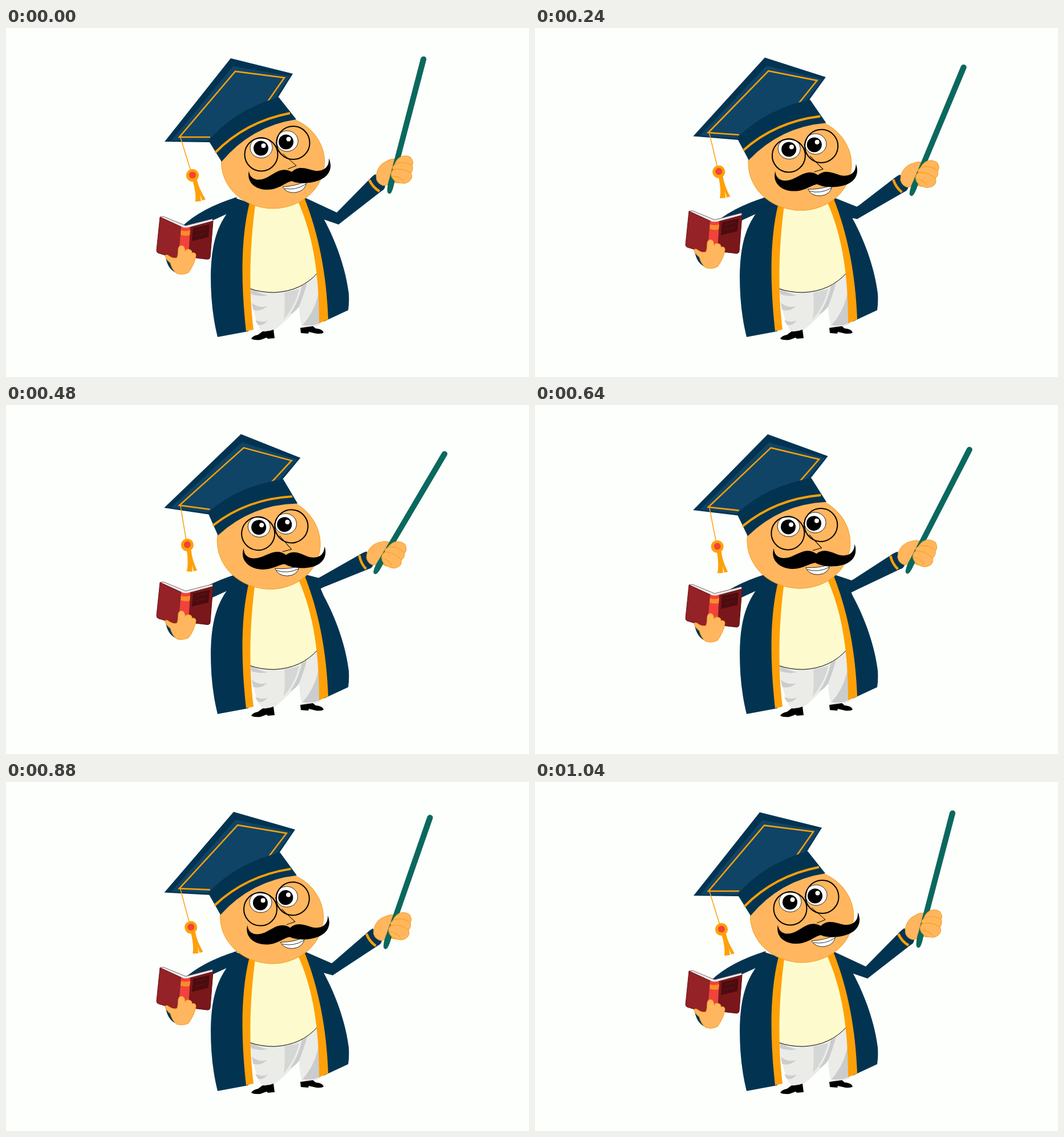
An HTML page for the animation above (1120 ms loop, 917 px wide and 611 px high).

```html
<!DOCTYPE html>
<html lang="en">
<head>
<meta charset="utf-8">
<title>Professor with pointer</title>
<style>
  html, body { margin: 0; width: 100%; height: 100%; overflow: hidden; background: #fcfffc; }
  svg { display: block; width: 917px; height: 611px; }
  .navy { fill: #023452; }
  .blue { fill: #0f4467; }
  .gold { fill: #ffa008; }
  .skin { fill: #ffb65e; }
  .edge { stroke: #f6a32a; stroke-width: 1.1; }
  .goldLine { fill: none; stroke: #ffa008; }
  .ink { fill: none; stroke: #000; }
</style>
</head>
<body>
<svg viewBox="0 0 917 611">
  <!-- left sleeve -->
  <path class="navy" d="M405 296Q343 315 309 347L325 362L362 337L395 322Z"/>

  <!-- pointing arm -->
  <path id="upperArm" class="navy"/>
  <g id="foreArm">
    <path class="navy" d="M580 323L640 262Q645 257 648 256Q653 269 665 276Q664 283 659 285L583 344Z"/>
    <path class="goldLine" stroke-width="4.5" d="M637 266Q643 279 655 286"/>
    <path class="skin edge" d="M650 266C647 252 655 238 668 233Q677 227 688 231L706 264Q694 274 680 270L664 276Q654 275 650 266Z"/>
    <path fill="#08695f" stroke="#075049" stroke-width=".6" d="M727.5 53Q729 49.500 733 50Q737.500 51 736.500 56L682 263Q679 282 675 288.500Q671 292 669 287Q668 277 673 262Z"/>
    <path class="skin edge" d="M681 240Q686 226 697 224Q710 223 712 231Q715 236 712 240Q715 247 710 254Q714 262 707 268Q700 274 690 271Q680 269 676 260Q674 253 679 248Q676 244 681 240Z"/>
    <path class="goldLine" stroke-width="1.1" d="M683 238Q697 232 711 240M679 248Q696 244 710 254M677 260Q687 258 697 268"/>
  </g>

  <!-- trousers and shoes -->
  <path fill="#ebebe8" d="M427 450L432 485Q438 514 447 529Q460 534 470 529Q486 518 514 488Q515 510 519 523Q536 526 551 519L551 425Z"/>
  <g fill="#cacccd">
    <path d="M429 456Q444 465 459 468Q444 471 430 466Z"/>
    <path d="M431 481Q442 491 458 487Q445 498 433 493Z"/>
    <path d="M437 511Q448 517 459 512Q450 523 441 519Z"/>
    <path opacity=".65" d="M488 463L514 457Q507 487 487 510Q490 486 488 463Z"/>
    <path d="M519 449Q515 477 498 501Q508 497 514 487Q522 468 528 445Z"/>
    <path d="M549 458Q543 495 520 520Q537 523 551 516Z"/>
  </g>
  <path d="M430 544Q432 539 442 537L450 531Q460 532 469 528L471 543L459 544L457 542L446 546Q435 547 430 544ZM516 525L538 522L543 526Q555 527 557 533Q554 536 544 535L531 532L530 535L517 534Z"/>

  <!-- robe and shirt -->
  <path class="navy" d="M400 297L430 307L420 400L425 531L371 541C362 505 359 470 359 434C360 388 366 353 390 321Z"/>
  <path class="navy" d="M520 296L546 308L557 334C579 374 596 423 601 465Q602 482 600 494L557 514C560 430 547 355 520 296Z"/>
  <path fill="#fdfbcd" d="M432 300L518 300Q543 355 547 428Q521 462 470 463Q446 463 427 456Q424 375 432 300Z"/>
  <path class="ink" stroke-width="1" d="M427 456Q446 463 470 463Q518 461 547 428"/>
  <path class="gold" d="M427 306L437 310C429 370 424 450 434 528L421 531C412 450 411 370 427 306Z"/>
  <path class="gold" d="M513 306L523 297C548 360 562 430 565 510L549 517C549 440 541 370 513 306Z"/>

  <!-- book hand -->
  <g id="book">
    <path class="navy" d="M280 401Q283 421 297 428L303 424L289 404Z"/>
    <path fill="#e9eef0" stroke="#6b3436" stroke-width=".8" d="M270 331L276 330L315 346L362 334L363 339L320 354Z"/>
    <path fill="#942226" stroke="#6e1418" d="M270 331L307 348L303 405L267 394Q264 393 264 389Z"/>
    <path fill="#7a171b" stroke="#5e1014" d="M322 349L363 338L358 401Q358 404 354 405L320 401Z"/>
    <path fill="#4c0c0f" d="M328 350L357 344L355 366L326 373Z"/>
    <path fill="none" stroke="#6a1418" d="M332 355L352 350M331 364L350 359"/>
    <path fill="#f1433b" d="M307 348Q315 351 323 348L320 403L302 404Z"/>
    <path fill="#fb8b2b" d="M307 354Q315 357 323 354L322 363Q314 365 306 362Z"/>
    <path class="skin edge" d="M279 399Q280 396 284 398Q293 405 300 402Q302 397 302 387Q303 381 308 381Q313 381 314 391Q317 386 322 388Q326 389 326 394Q332 392 333 398Q331 413 320 428Q311 433 300 430Q292 425 288 411Q280 405 279 399Z"/>
  </g>

  <!-- head and cap -->
  <g id="head">
    <ellipse class="skin edge" cx="468" cy="234.5" rx="90.5" ry="81.5"/>
    <path class="navy" d="M394 53L503 80L476 123L358 200L278 199Z"/>
    <path class="blue" d="M398 67L498 84L470 126L358 197L290 197Z"/>
    <path class="goldLine" stroke-width="2.6" d="M358 191L304 191L402 76L488 87L458 130"/>
    <path class="navy" d="M355 197Q400 144 478 121L509 160Q430 172 378 234Z"/>
    <path class="goldLine" stroke-width="4" d="M367 218Q420 164 498 149"/>

    <path class="goldLine" stroke-width="1.5" d="M306 192L324 250"/>
    <path class="gold" d="M327 266L335 266Q338 281 350 300L344 302L340 291L342 303L332 304Q334 290 327 266Z"/>
    <circle class="gold" cx="327" cy="258" r="11"/>
    <circle fill="#f04438" cx="327" cy="257.5" r="6"/>

    <g fill="#fff" stroke="#000" stroke-width=".8">
      <ellipse cx="447.5" cy="209.5" rx="19.5" ry="18"/>
      <ellipse cx="493" cy="198" rx="19" ry="18"/>
      <path d="M485 278Q507 277 527 268Q526 285 508 288Q492 290 485 278Z"/>
      <path fill="none" d="M488 281Q508 285 526 273"/>
    </g>
    <circle cx="447" cy="210.5" r="13"/>
    <circle cx="491" cy="199.5" r="13"/>
    <g fill="#fff">
      <circle cx="451.5" cy="206" r="4"/>
      <circle cx="495.5" cy="194.5" r="4"/>
    </g>
    <g class="ink" stroke-width="2">
      <circle cx="447.5" cy="221.5" r="29"/>
      <circle cx="503.5" cy="201" r="29"/>
    </g>
    <path class="ink" stroke-width="1" d="M477 217Q476 206 473 200M485 220L509 241L494 247"/>
    <path d="M426 250C427 264 440 270 457 262C472 254 484 242 501 252C514 239 530 248 542 250C556 251 567 245 566 228C574 246 566 260 548 267C532 273 512 273 501 268C490 270 480 282 460 283C438 284 421 270 426 250Z"/>
  </g>
</svg>
<script>
  const STEP = 80, STEPS = 14;
  const part = id => document.getElementById(id);
  const [upperArm, foreArm, book, head] = ["upperArm", "foreArm", "book", "head"].map(part);

  function pose(p) {
    head.setAttribute("transform", `rotate(${6.1 * p} 418 184)`);
    foreArm.setAttribute("transform", `rotate(${12.5 * p} 639 202)`);
    book.setAttribute("transform", `translate(0 ${-16 * p})`);
    // shoulder stays put while the elbow follows the forearm
    upperArm.setAttribute("d",
      `M522 296L${580 - 25 * p} ${323 - 16 * p}l4 -2l3 19L${583 - 29 * p} ${344 - 15.5 * p}L545 331Z`);
  }

  function draw(now) {
    const k = Math.floor(now / STEP) % STEPS;
    // swing out and back, 7 units every 3 steps
    pose(Math.floor(Math.min(k, STEPS - 1 - k) * 7 / 3) / 11);
    requestAnimationFrame(draw);
  }
  draw(performance.now());
</script>
</body>
</html>
```
